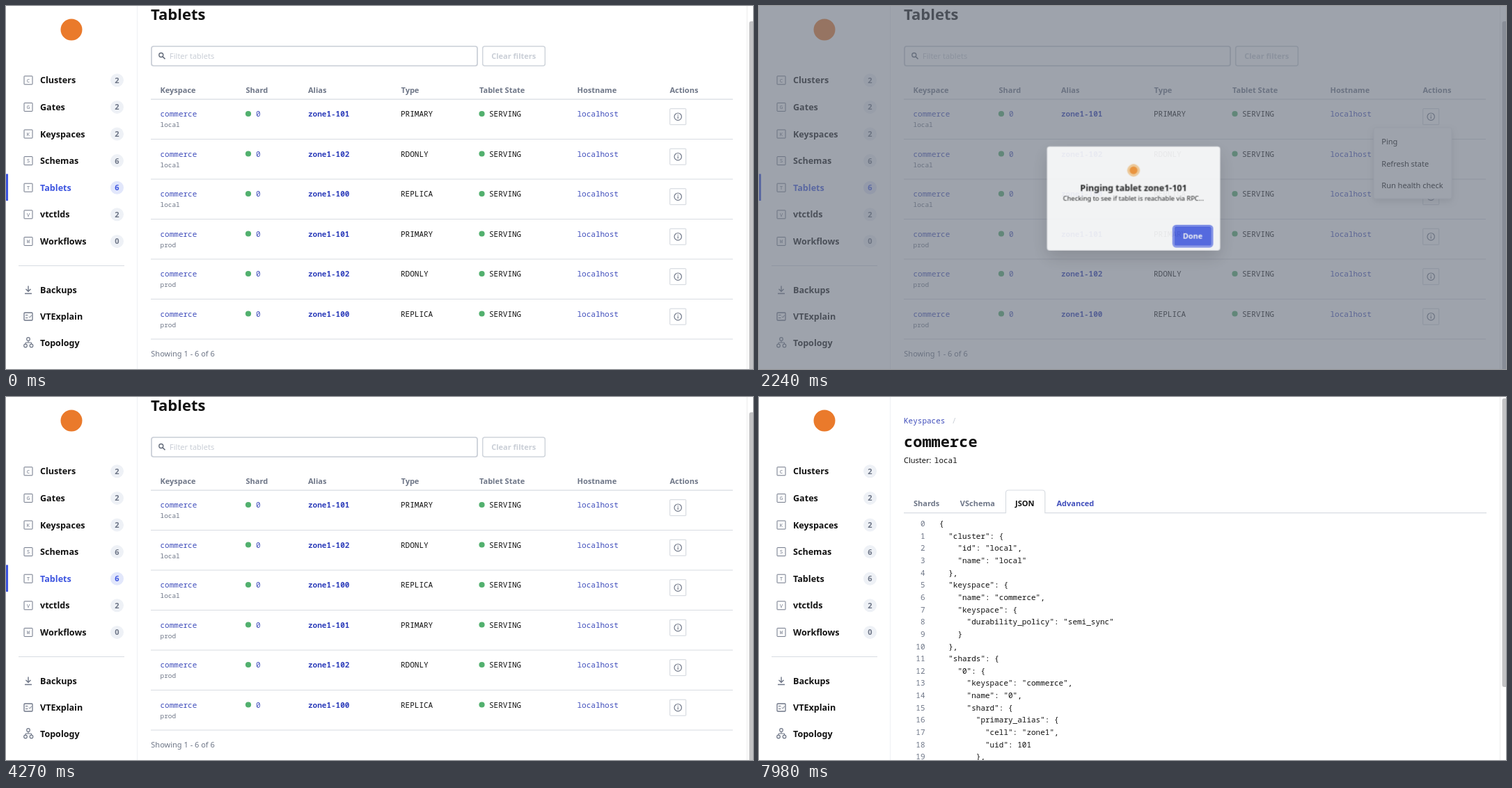
An HTML page for the animation above (8000 ms loop, 1073 by 522 pixels).

```html
<!DOCTYPE html>
<html lang="en">
<head>
<meta charset="utf-8">
<title>Tablet admin</title>
<style>
  html, body { margin: 0; width: 100%; height: 100%; overflow: hidden; background: #fff; }
  svg { display: block; }
  text { font: 11px "Noto Sans", sans-serif; fill: #111; white-space: pre; }
  .bold { font-weight: 600; }
  .mono { font-family: "Noto Sans Mono", monospace; }
  .small { font-size: 9.43px; }
  .nav { font-size: 12.57px; font-weight: 600; }
  .title { font-size: 22px; font-weight: 700; }
  .letter { font-size: 7.5px; }
  .mid { text-anchor: middle; }
  .end { text-anchor: end; }
  .grey { fill: #6e7687; }
  .pale { fill: #c9ced6; }
  .link { fill: #3f4dbb; }
  .strong { fill: #2f3fbb; font-weight: 600; }
  .active { fill: #3d55e0; }
  .white { fill: #fff; }
  .icon { fill: none; stroke: #6e7687; }
  .rule { stroke: #d8dce2; }
  .box { fill: #fff; stroke: #d0d5dc; }
  .green { fill: #52b06e; }
  .shadow { filter: drop-shadow(0 4px 5px rgba(0, 0, 0, .14)); }
  .deep { filter: drop-shadow(0 10px 12px rgba(0, 0, 0, .16)); }

  .cue { animation: 8s step-end infinite; }
  .tablets { animation-name: tablets; }
  .menu { animation-name: menu; }
  .pointed { animation-name: pointed; }
  .veil { animation-name: veil; }
  .panel { animation-name: veil, zoom; transform-origin: 538px 276.7px; }
  .message { animation-name: message; }
  .keyspace { animation-name: keyspace; }
  .shards { animation-name: shards; }
  .vschema { animation-name: vschema; }
  .json { animation-name: json; }
  .hover1 { animation-name: hover1; }
  .hover2 { animation-name: hover2; }
  .hover3 { animation-name: hover3; }

  @keyframes tablets { 0% { opacity: 1 } 63% { opacity: 0 } }
  @keyframes menu { 0% { opacity: 0 } 8.75% { opacity: .6 } 9.625% { opacity: 1 } 28.875% { opacity: 0 } }
  @keyframes pointed { 0% { opacity: 0 } 14.875% { opacity: 1 } 28% { opacity: 0 } }
  @keyframes veil {
    0% { opacity: 0 } 27.125% { opacity: .5 } 28% { opacity: .87 } 28.875% { opacity: .97 } 29.75% { opacity: 1 }
    50.75% { opacity: .95 } 51.625% { opacity: .71 } 52.5% { opacity: .22 } 53.375% { opacity: 0 }
  }
  @keyframes zoom {
    0% { transform: scale(.95) } 27.125% { transform: scale(.975) } 28% { transform: scale(.9935) }
    28.875% { transform: scale(.9985) } 29.75% { transform: scale(1) } 50.75% { transform: scale(.9975) }
    51.625% { transform: scale(.9855) } 52.5% { transform: scale(.96) }
  }
  @keyframes message { 0% { opacity: 1 } 50.75% { opacity: 0 } }
  @keyframes keyspace { 0% { opacity: 0 } 63% { opacity: 1 } }
  @keyframes shards { 0% { opacity: 0 } 63% { opacity: 1 } 76.125% { opacity: 0 } }
  @keyframes vschema { 0% { opacity: 0 } 76.125% { opacity: 1 } 88.375% { opacity: 0 } }
  @keyframes json { 0% { opacity: 0 } 88.375% { opacity: 1 } }
  @keyframes hover1 { 0% { fill: #6e7687 } 70% { fill: #3f4dbb } }
  @keyframes hover2 { 0% { fill: #6e7687 } 83.125% { fill: #3f4dbb } }
  @keyframes hover3 { 0% { fill: #6e7687 } 94.5% { fill: #3f4dbb } }
</style>
</head>
<body>
<svg id="stage" width="1073" height="522" viewBox="0 0 1073 522"></svg>
<script>
const text = (x, y, str, cls = '') => `<text x="${x}" y="${y}" class="${cls}">${str}</text>`;
const rect = (x, y, w, h, r, attrs) => `<rect x="${x}" y="${y}" width="${w}" height="${h}" rx="${r}" ${attrs}/>`;
const disc = (x, y, r, attrs) => `<circle cx="${x}" cy="${y}" r="${r}" ${attrs}/>`;
const path = (d, attrs = 'class="icon"') => `<path d="${d}" ${attrs}/>`;
const rule = (x1, x2, y) => path(`M${x1} ${y}H${x2}`, 'class="rule" stroke-width="1.2"');
const dot = (x, y) => disc(x, y, 4.1, 'class="green"');
const cue = (name, ...parts) => `<g class="cue ${name}">${parts.join('')}</g>`;
const list = (items, draw) => items.map(draw).join('');

function navItem([label, count], i) {
  const y = 106.8 + 38.6 * i;
  return rect(26, y - 6, 12, 12, .5, 'class="icon"')
    + text(32, y + 2.8, label[0].toUpperCase(), 'mono letter grey mid')
    + text(49, y + 4.6, label, 'nav')
    + disc(159.5, y, 9.5, 'fill="#eef1f6"')
    + text(159.5, y + 4, count, 'bold grey mid');
}

const sidebar = () => disc(94, 34, 15.5, 'fill="#ea7a2b"')
  + list([['Clusters', 2], ['Gates', 2], ['Keyspaces', 2], ['Schemas', 6],
          ['Tablets', 6], ['vtctlds', 2], ['Workflows', 0]], navItem)
  + rule(18, 170, 373.5)
  + path('M188.5 0V522', 'stroke="#eef0f3"')
  + path('M32 402.5V410M28.5 407L32 410.5L35.5 407M27 413.5H37', 'class="icon" stroke-width="1.4"')
  + rect(26, 441, 12, 11, 1, 'class="icon" stroke-width="1.3"')
  + path('M28 444.5H31.5M28 448.5H31.5M33 446.5L34.3 448L36.8 444.5')
  + disc(32, 479, 2.3, 'class="icon" stroke-width="1.2"')
  + disc(28, 488.5, 2.3, 'class="icon" stroke-width="1.2"')
  + disc(36.5, 488.5, 2.3, 'class="icon" stroke-width="1.2"')
  + path('M32 481.5V484M28 486V484H36.5V486')
  + text(49, 413.2, 'Backups', 'nav') + text(49, 451.2, 'VTExplain', 'nav') + text(49, 488.7, 'Topology', 'nav');

function filterBar(y, hint, border, icon) {
  return rect(209, y, 468, 28, 3, `fill="#fff" stroke="${border}" stroke-width="1.7"`)
    + disc(222.8, y + 12.5, 3, `fill="none" stroke="${icon}" stroke-width="1.3"`)
    + path(`M225 ${y + 14.8}L228.5 ${y + 18.3}`, `stroke="${icon}" stroke-width="1.6"`)
    + text(235, y + 18.3, hint, 'pale')
    + rect(684.7, y, 89.6, 28, 3, 'class="box" stroke-width="1.5"')
    + text(729.3, y + 18, 'Clear filters', 'bold pale mid');
}

const headers = (y, cols) => list(cols, ([x, label]) => text(x, y, label, 'bold grey'));

const kinds = [['zone1-101', 'PRIMARY'], ['zone1-102', 'RDONLY'], ['zone1-100', 'REPLICA']];

function tabletRow(i) {
  const y = 155 + 57.5 * i, base = y + 4;
  const [alias, kind] = kinds[i % 3];
  return text(221.5, base, 'commerce', 'mono link')
    + text(221.5, y + 19, i < 3 ? 'local' : 'prod', 'mono small grey')
    + dot(348, y) + text(359, base, '0', 'mono link')
    + text(434, base, alias, 'mono strong')
    + text(567, base, kind, 'mono')
    + dot(683.5, y) + text(694, base, 'SERVING', 'mono')
    + text(820.5, base, 'localhost', 'mono link')
    + rect(953.7, y - 7.3, 23, 23, .5, 'class="box"')
    + disc(965.2, y + 4.2, 5.2, 'class="icon" stroke-width="1.2"')
    + path(`M965.2 ${y + 3.6}V${y + 7}M965.2 ${y + 1.3}V${y + 2.5}`, 'class="icon" stroke-width="1.2"')
    + rule(208, 1044, y + 36.5);
}

const scrollbar = (y, h) => path('M1064.5 0V522', 'stroke="#ececec"')
  + rect(1067.5, y, 8, h, 3, 'fill="#c2c2c4"');

const tabletsPage = () => rect(0, 241.5, 3, 38.5, 0, 'fill="#3d55e0"')
  + rect(45, 248, 126, 26, 0, 'fill="#fff"')
  + text(49, 265.8, 'Tablets', 'nav active')
  + disc(159.5, 261.2, 9.5, 'fill="#e2e7fb"') + text(159.5, 265.2, '6', 'bold active mid')
  + text(208, 20, 'Tablets', 'title')
  + filterBar(58, 'Filter tablets', '#c9ced6', '#5f6776')
  + headers(124.5, [[221.5, 'Keyspace'], [344.5, 'Shard'], [434, 'Alias'], [567.5, 'Type'],
                    [680, 'Tablet State'], [820.5, 'Hostname'], [953.5, 'Actions']])
  + rule(208, 1044, 134.2)
  + list([0, 1, 2, 3, 4, 5], tabletRow)
  + text(208.3, 504, 'Showing 1 - 6 of 6', 'grey')
  + scrollbar(22, 520);

const actionMenu = () => rect(883, 175, 112, 102, 3, 'fill="#fff" stroke="#f0f1f3" class="shadow"')
  + cue('pointed', rect(883, 179, 112, 31, 0, 'fill="#f1f2f4"'))
  + text(894.3, 199, 'Ping') + text(894.3, 230.5, 'Refresh state') + text(894.3, 262, 'Run health check');

const dialog = () => rect(412.8, 201.5, 250.4, 150.4, 4, 'fill="#fff" class="deep"')
  + cue('message',
      disc(538, 236, 8.3, 'fill="#fbd9a8" stroke="#f6b25f"'),
      disc(538, 236, 5.8, 'fill="#f5922f"'),
      text(538, 266.5, 'Pinging tablet zone1-101', 'nav mid'),
      text(538, 280, 'Checking to see if tablet is reachable via RPC...', 'small mid'),
      rect(595.2, 315.8, 57, 31, 4.5, 'fill="#fff" stroke="#5068ea" stroke-width="1.6"'))
  + rect(596.5, 317, 54.4, 28.5, 3, 'fill="#4a61e6"')
  + text(623.5, 335.3, 'Done', 'bold white mid');

const tabSpecs = [['Shards', 208.5, 64], ['VSchema', 275.3, 76.5], ['JSON', 354.5, 56.3], ['Advanced', 414, 79]];

function tabs(active, right) {
  const [, x, w] = tabSpecs[active];
  const frame = `M208 166.7H${x}V138q0 -4 4 -4H${x + w - 4}q4 0 4 4V166.7H${right}`;
  return path(frame, 'class="rule" fill="none" stroke-width="1.2"')
    + list(tabSpecs, ([label, left], i) => {
      const look = i === active ? '' : i === active + 1 ? `grey cue hover${i}` : 'grey';
      return text(left + 13.5, 157, label, 'bold ' + look);
    });
}

const code = data => list(JSON.stringify(data, null, 2).split('\n').slice(0, 20), (line, i) => {
  const y = 186.2 + 17.63 * i;
  return text(238.5, y, i, 'mono grey end') + text(259, y, line, 'mono');
});

const keyspaceHead = () => text(208, 37.7, 'Keyspaces', 'mono link')
  + text(277, 37.7, '/', 'mono pale')
  + text(208, 72, 'commerce', 'mono title')
  + text(208, 95, 'Cluster:') + text(251.8, 95, 'local', 'mono');

const shardsTab = () => tabs(0, 1056)
  + filterBar(185, 'Filter shards', '#3b49b8', '#3b49b8')
  + headers(251.5, [[221.5, 'Shard'], [352.3, 'Primary Serving?'], [520, 'Tablets'], [919.7, 'Primary Tablet']])
  + rule(208, 1056, 261.5)
  + text(221.5, 286, 'commerce/0', 'mono strong')
  + list([356, 524, 617, 704, 923.3], x => dot(x, 282))
  + text(366.5, 286, 'SERVING', 'mono')
  + list([[534.3, '1 PRIMARY'], [627.5, '1 RDONLY'], [714.2, '1 REPLICA']], ([x, s]) => text(x, 286, s, 'mono'))
  + text(601, 286, '/', 'pale') + text(688, 286, '/', 'pale')
  + text(933.8, 286, 'zone1-101', 'mono link')
  + text(919.7, 301, 'localhost', 'mono small grey')
  + rule(208, 1056, 319)
  + text(208.3, 343.7, 'Showing 1 of 1', 'grey');

const cluster = { id: 'local', name: 'local' };
const vschema = {
  cluster, name: 'commerce',
  v_schema: { tables: { corder: {}, customer: {}, product: {} } }
};
const keyspace = {
  cluster,
  keyspace: { name: 'commerce', keyspace: { durability_policy: 'semi_sync' } },
  shards: { 0: {
    keyspace: 'commerce', name: '0',
    shard: { primary_alias: { cell: 'zone1', uid: 101 }, is_primary_serving: true }
  } }
};

document.getElementById('stage').innerHTML = sidebar()
  + cue('tablets', tabletsPage())
  + cue('menu', actionMenu())
  + cue('keyspace', keyspaceHead())
  + cue('shards', shardsTab())
  + cue('vschema', tabs(1, 1056), code(vschema))
  + cue('json', tabs(2, 1045), code(keyspace), scrollbar(2, 415))
  + cue('veil', rect(0, 0, 1073, 522, 0, 'fill="#6b7280" fill-opacity=".75"'))
  + cue('panel', dialog());
</script>
</body>
</html>
```
